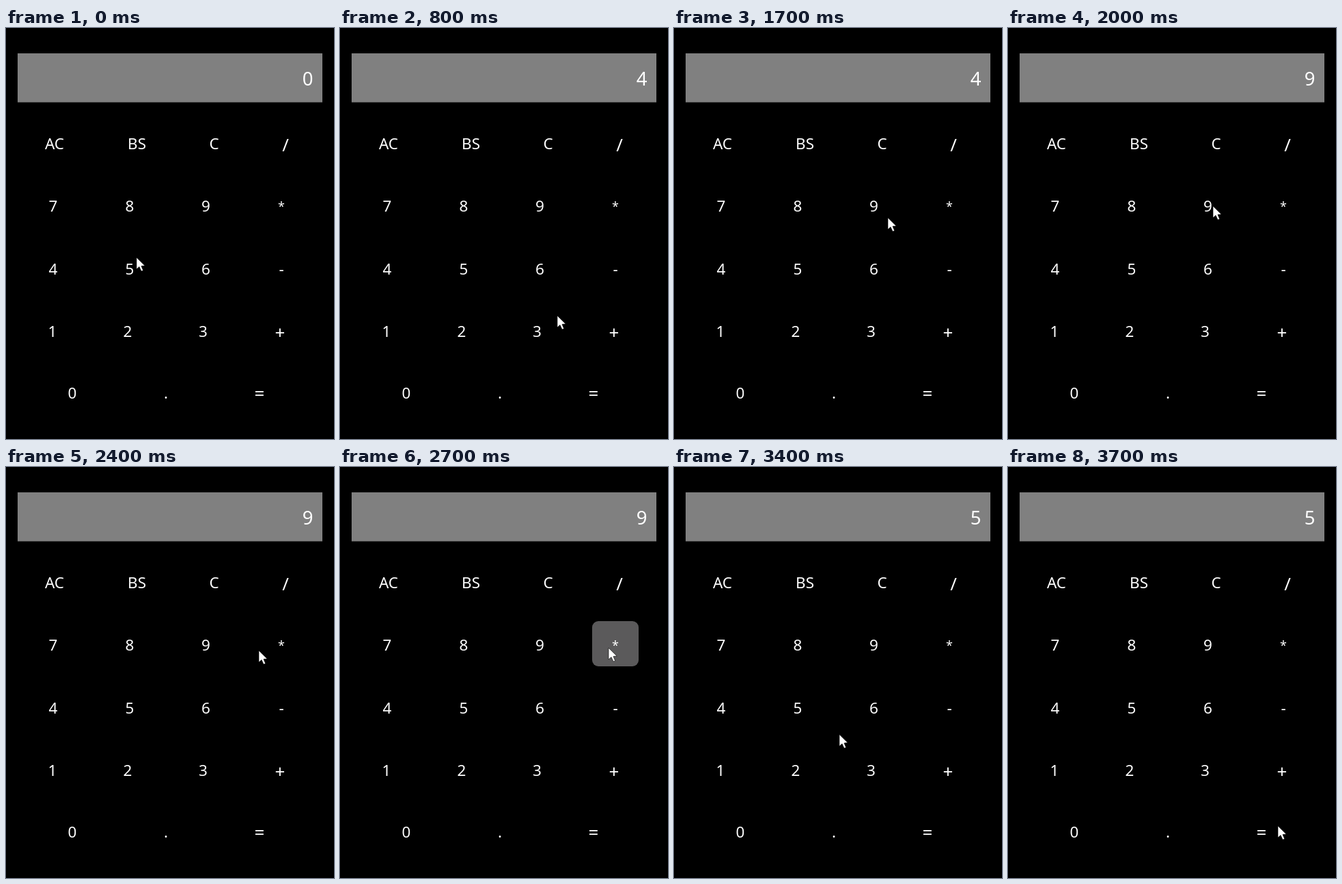
An HTML page that plays this animation: 480 px wide and 600 px high, repeating every 3900 ms.

```html
<!DOCTYPE html>
<html lang="en">
<head>
<meta charset="utf-8">
<title>Calculator</title>
<style>
  html, body { margin: 0; width: 100%; height: 100%; overflow: hidden; background: #000; }
  svg { display: block; }
  text { font: 22.5px "Noto Sans", "Open Sans", sans-serif; fill: #fff; text-anchor: middle; }
  #display { font-size: 27.5px; text-anchor: end; }
</style>
</head>
<body>
<svg width="480" height="600" viewBox="0 0 480 600">
  <rect x="17" y="37" width="446" height="71.5" fill="#808080"/>
  <text id="display" x="449.5" y="84"></text>
  <rect id="press" height="66" rx="9"/>
  <g id="keys"></g>
  <path id="arrow" d="M0 0V17L4 13.5L7 20L9.7 18.9L7 12.5L12.2 12Z" fill="#fff" stroke="#000" stroke-width=".6"/>
  <path id="beam" d="M-4 -9H-1L0 -8L1 -9H4M0 -8V8M-4 9H-1L0 8L1 9H4" fill="none" stroke="#111" stroke-width="1.2"/>
</svg>
<script>
const LOOP = 3900, STEP = 100;
const $ = id => document.getElementById(id);

// label, centre x, baseline y, optional font size
const keys = [
  ['AC', 71, 177], ['BS', 191.5, 177], ['C', 304.5, 177], ['/', 409, 179.5, 26],
  ['7', 69, 268], ['8', 181, 268], ['9', 292.5, 268], ['*', 403, 267, 18],
  ['4', 69, 359.5], ['5', 181, 359.5], ['6', 292.5, 359.5], ['-', 403, 359.5],
  ['1', 68, 450.5], ['2', 178, 450.5], ['3', 288.5, 450.5], ['+', 401, 453.5, 26],
  ['0', 97, 541], ['.', 234, 541], ['=', 371, 542.5, 26]
];
for (const [label, x, y, size] of keys) {
  const text = document.createElementNS('http://www.w3.org/2000/svg', 'text');
  text.textContent = label;
  text.setAttribute('x', x);
  text.setAttribute('y', y);
  if (size) text.style.fontSize = size + 'px';
  $('keys').append(text);
}

// time, pointer x, pointer y
const path = [
  [0, 191, 335], [300, 68, 350], [600, 68, 350], [800, 318, 420],
  [1100, 403, 444], [1200, 408, 448], [1300, 408, 448], [1700, 313, 277],
  [1800, 300, 260], [2000, 300, 260], [2400, 370, 268], [2600, 393, 264],
  [2700, 393, 264], [2900, 319, 312], [3100, 191, 346], [3300, 191, 346],
  [3700, 395, 524], [LOOP, 395, 524]
];
const readings = [[0, '0'], [600, '4'], [2000, '9'], [2800, '13'], [3400, '5']];
// time, x, y, width, fill; each lasts one step
const presses = [
  [1200, 364, 408, 74, '#4a4a4a'], [1900, 257, 225, 72, '#555'],
  [2700, 369, 225, 68, '#5b5a5b'], [3300, 146, 317, 71, '#555']
];

function pointerAt(t) {
  const i = path.findIndex(p => p[0] > t);
  const [t0, x0, y0] = path[i - 1], [t1, x1, y1] = path[i];
  const k = (t - t0) / (t1 - t0);
  return [x0 + (x1 - x0) * k, y0 + (y1 - y0) * k];
}

function draw(now) {
  const t = Math.floor(now % LOOP / STEP) * STEP;
  $('display').textContent = readings.findLast(r => r[0] <= t)[1];

  const press = presses.find(p => p[0] === t);
  $('press').style.display = press ? '' : 'none';
  if (press) ['x', 'y', 'width', 'fill'].forEach((name, i) => $('press').setAttribute(name, press[i + 1]));

  const overText = t === 1200;
  for (const id of ['arrow', 'beam']) {
    $(id).setAttribute('transform', `translate(${pointerAt(t)})`);
    $(id).style.display = (id === 'beam') === overText ? '' : 'none';
  }
}

const start = performance.now();
function tick() {
  draw(performance.now() - start);
  requestAnimationFrame(tick);
}
tick();
</script>
</body>
</html>
```
